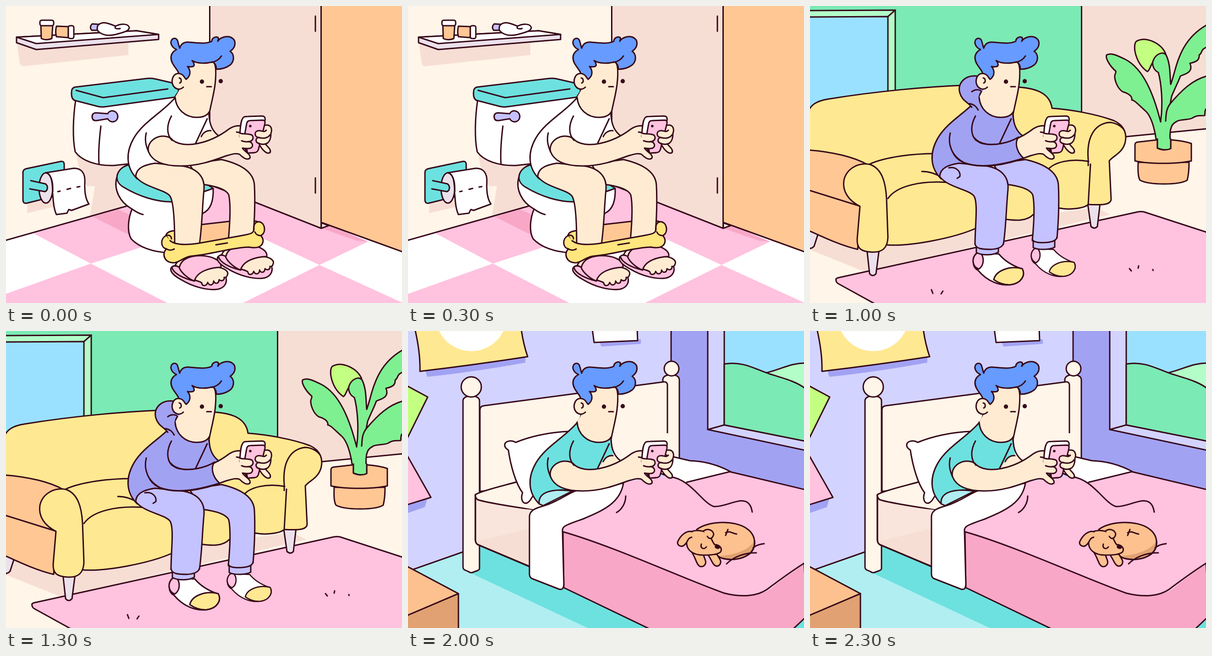
Recreate the animation shown at these times as an HTML page with a canvas. Size 864 by 648 pixels, loop 2.5 s.

```html
<!DOCTYPE html>
<html lang="en">
<head>
<meta charset="utf-8">
<title>Always on the phone</title>
<style>
html, body { margin: 0; width: 100%; height: 100%; overflow: hidden; background: #fff5e9; }
canvas { display: block; width: 864px; height: 648px; }
</style>
</head>
<body>
<canvas id="stage" width="864" height="648"></canvas>
<script>
const ctx = document.getElementById('stage').getContext('2d');
const SCENE_MS = 500;
const INK = '#360818', SKIN = '#ffebd2', WHITE = '#fff', CREAM = '#fff5e9', BLUSH = '#f7ded5',
  PINK = '#ffc2df', ROSE = '#f8a7c7', YELLOW = '#ffe67f', SOFA = '#ffe892', ORANGE = '#ffc794',
  BROWN = '#e1a172', TEAL = '#6de1df', ICE = '#b0eef1', SKY = '#9ae1ff', LILAC = '#c4c2ff',
  VIOLET = '#a2a2f3', PALE = '#d3d3ff', GREY = '#ebe1eb', GREEN = '#7ef091', MINT = '#7beab5',
  LIME = '#c3ff80', HAIR = '#679bff';

ctx.lineCap = ctx.lineJoin = 'round';

function fill(d, color) {
  ctx.fillStyle = color;
  ctx.fill(new Path2D(d));
}
function line(d, color = INK, width = 3) {
  ctx.strokeStyle = color;
  ctx.lineWidth = width;
  ctx.stroke(new Path2D(d));
}
function shape(d, color) {
  fill(d, color);
  line(d);
}
function oval(x, y, rx, ry, color, outlined = true, turn = 0) {
  ctx.beginPath();
  ctx.ellipse(x, y, rx, ry, turn, 0, 7);
  ctx.fillStyle = color;
  ctx.fill();
  if (!outlined) return;
  ctx.strokeStyle = INK;
  ctx.lineWidth = 3;
  ctx.stroke();
}
function bar(x, y, w, h, r, color) {
  ctx.beginPath();
  ctx.roundRect(x, y, w, h, r);
  ctx.fillStyle = color;
  ctx.fill();
  ctx.strokeStyle = INK;
  ctx.lineWidth = 3;
  ctx.stroke();
}
function back(color) {
  ctx.fillStyle = color;
  ctx.fillRect(0, 0, 864, 648);
}
function placed(x, y, scale, draw) {
  ctx.save();
  ctx.translate(x, y);
  ctx.scale(scale, scale);
  draw();
  ctx.restore();
}

// ---- the man ----
function head(chin = true) {
  fill('M396 132L380 180L369 199C371 226 392 243 416 243C432 243 441 238 444 228L455 175C460 146 460 126 451 121L405 118Z', SKIN);
  line('M451 121C459 126 459 146 456 172C453 195 447 215 443 237');
  if (chin) line('M369 199C371 226 392 243 416 243C432 243 440 238 444 230');
  shape('M377 148C376 138 359 128 360 111C361 102 366 98 372 95C361 90 357 80 362 73C366 69 372 70 374 75C376 80 377 87 379 92C382 82 390 78 400 79C421 81 437 83 449 77C449 70 458 65 463 69C464 72 463 75 462 77C467 68 481 65 490 68C504 74 502 90 489 99C498 104 499 119 490 128C481 135 469 138 459 138C459 131 456 125 451 122C440 125 418 127 406 119C411 124 412 130 408 132C404 133 400 133 396 132C403 140 404 152 393 160L385 151Z', HAIR);
  line('M470 109C465 117 458 121 449 123');
  shape('M389 155C384 146 371 144 365 154C359 166 364 178 374 181C379 182 384 180 387 177', SKIN);
  line('M378 157C383 158 384 166 379 168');
  line('M438 176H448');
  oval(427.5, 165, 4.7, 4.7, INK, false);
  oval(468.5, 164, 4.7, 4.7, INK, false);
}

function torso(color) {
  shape('M378 181C377 191 373 196 369 200C342 232 300 252 279 288C261 319 261 352 286 377C286 355 310 346 345 347L420 300L447 272C446 262 444 250 443 238', color);
}

function farArm(sleeve, long) {
  const arm = 'M443 238C444 261 452 275 465 284L440 297L414 300L438 246';
  fill(arm, long ? sleeve : SKIN);
  if (!long) {
    fill('M443 238C446 254 447 262 447 272C438 271 430 276 426 284L414 300L438 246Z', sleeve);
    line('M447 272C438 271 430 276 426 285');
  }
  line('M443 238C444 261 452 275 465 284M439 246L414 299');
}

function nearArm(sleeve, long) {
  shape('M511 324C503 320 494 323 480 327C450 338 420 349 380 349C345 349 320 341 311 318C305 295 335 275 359 288C372 304 398 304 418 300C448 294 470 281 487 268C495 263 505 260 514 262', SKIN);
  if (long) {
    fill('M466 332C440 342 410 349 380 349C340 347 304 332 304 290L330 270L361 289C372 304 398 304 418 300C433 297 444 293 455 286C446 297 450 318 466 332Z', sleeve);
    line('M306 277C300 302 309 328 337 342C368 354 412 349 466 332C450 318 446 297 455 286C444 293 433 297 418 300C398 304 372 304 361 291');
  } else {
    line('M306 277C302 292 305 305 311 318');
  }
  line('M361 240C350 260 350 280 362 293');
}

function phoneAndHands() {
  shape('M510 285C511 265 512 252 516 246C518 241 522 241 528 241L558 240Q567 240 565 250L550 312Q548 320 540 320L526 321Z', WHITE);
  shape('M520 285L525 257Q526 250 533 250L560 249Q566 249 565 256L551 312Q549 320 541 320L527 321Z', PINK);
  oval(533, 262, 2.8, 2.8, INK, false);
  shape('M509 276C512 281 530 277 537 282C542 289 537 296 528 296C538 296 541 306 534 310C529 312 522 311 516 310C519 317 536 324 532 332C526 337 517 331 510 324', SKIN);
  line('M514 294C519 296 523 297 528 296M503 275L509 276');
  shape('M566 260C577 258 582 267 578 278C578 290 574 299 566 301C570 307 580 313 576 320C568 325 556 310 552 300C542 297 545 287 552 287C541 286 541 273 551 272C558 271 563 277 568 271', SKIN);
  line('M552 287C562 290 572 288 576 281M552 300C557 302 562 302 566 301');
}

function upperBody(sleeve, long) {
  farArm(sleeve, long);
  nearArm(sleeve, long);
  head();
  phoneAndHands();
}

function legs(color, ankle) {
  shape('M485 512C489 470 490 430 486 412C481 401 460 393 428 389L400 345L470 335C505 343 541 358 542 392C544 430 542 470 539 506', color);
  shape(`M${ankle} 520C${ankle} 480 367 430 358 415C348 400 300 396 283 372C284 354 300 347 325 343L385 349C420 355 434 375 432 400C428 440 428 480 422 520`, color);
}

// ---- bathroom ----
function slipper() {
  shape('M366 567C354 572 358 584 382 597C408 613 440 621 462 618C478 615 484 602 479 590L420 568Z', PINK);
  shape('M369 566C375 553 392 543 412 543L424 560L388 574Z', SKIN);
  shape('M412 598C412 583 430 573 460 570C476 571 487 579 483 587C482 591 479 593 476 592C477 600 469 601 465 597C464 607 456 607 453 600C453 609 444 612 440 603C438 611 428 613 427 604C423 601 417 600 412 598Z', SKIN);
  shape('M378 571C382 551 404 543 432 545C458 548 471 559 469 570C444 571 417 579 411 600C399 596 382 582 378 571Z', PINK);
  line('M362 570C364 583 388 595 411 600');
}

function bathroom() {
  back(WHITE);
  fill('M60 496L190 458L450 380L543 428L688 485L705 478L790 514L684 565L545 500L330 515L185 562ZM0 628L185 562L352 648H0ZM517 648L684 565L866 648Z', PINK);
  fill('M190 460L245 444L280 460V505ZM688 485L705 478L790 514L765 512Z', ROSE);
  fill('M0 0H444V390L240 442L0 511Z', CREAM);
  fill('M153 320C158 355 165 385 178 393H194L183 460L250 441L290 380V340ZM47 430L46 452L106 438V420ZM24 82L66 96L267 80V107L42 131Q32 133 30 125Z', BLUSH);
  line('M0 511L265 436');
  shape('M444.500 -5V390L543 428L687.500 485V-5Z', BLUSH);
  shape('M687.500 -5V472L870 538V-5Z', ORANGE);
  shape('M688 485L704 479L688 473Z', CREAM);
  line('M675 22V55M675 375V408');

  shape('M23 68L285 54L333 62V73L66 95L23 80Z', GREY);
  shape('M23 68L285 54L333 62L66 82Z', WHITE);
  shape('M76 42L77 71Q88 76 100 71L102 42Z', ORANGE);
  bar(74, 31, 30, 12, 4, WHITE);
  shape('M136 45L110 44Q107 56 110 67L136 69Z', ORANGE);
  bar(136, 43, 12, 28, 4, WHITE);
  shape('M203 40L188 39Q181 46 187 53L201 53Z', LILAC);
  shape('M203 40C213 33 224 38 239 44C251 38 267 38 269 47C269 55 254 58 240 62C224 66 209 64 200 54C198 48 199 43 203 40Z', WHITE);
  line('M239 44C235 49 243 51 249 49');

  shape('M37 363Q37 357 44 355L120 339Q127 338 127 346V410L46 430Q38 432 37 424Z', TEAL);
  shape('M86 364L148 354C165 354 173 365 172 384C171 405 173 421 181 432L143 446L137 444L133 452L110 455C103 440 103 420 101 400Z', WHITE);
  oval(87, 397, 15, 33, GREY);
  line('M88 364C101 368 101 389 102 405');
  fill('M53 381L86 388C92 392 92 402 85 405L52 399Z', TEAL);
  line('M54 381L86 388C92 392 92 402 85 405L52 399M113 405L118 404M133 400L141 398M155 395L161 394');

  shape('M152 205C146 245 145 290 151 318C165 338 198 349 235 348L290 342L370 199Z', WHITE);
  shape('M150 177L308 158Q317 157 325 159L377 171L376 187L368 199L215 220Q208 221 200 219L150 206Q142 203 143 188Q143 179 150 177Z', TEAL);
  line('M153 184L212 200L353 181M207 262C203 295 201 320 203 345');
  shape('M222 235L196 233Q187 234 188 243Q189 251 198 250L222 246C227 256 243 255 244 241C243 227 226 225 222 235Z', LILAC);

  shape('M242 373C234 400 248 428 275 443C266 465 264 492 273 508C290 526 320 537 360 539L430 452C447 444 453 423 452 398Z', WHITE);
  shape('M265 347C239 357 234 382 256 395C289 415 330 429 368 427L452 398L410 370Z', TEAL);
  line('M275 443C282 448 290 453 299 455');

  shape('M349 500C352 490 367 490 390 488L530 470C545 466 561 472 563 488L550 515L360 520Z', YELLOW);
  fill('M390 483L530 466V507L390 513Z', ORANGE);
  line('M390 481L530 465');
  torso(WHITE);
  legs(SKIN, 368);
  slipper();
  placed(107, -15, .985, slipper);
  shape('M349 501C336 508 337 527 350 530C339 540 345 562 368 560C380 558 387 549 402 546C450 542 490 527 530 526C548 530 561 525 561 511C560 506 558 503 556 501C567 496 567 476 554 471C545 469 540 476 541 486C542 497 529 498 514 501L424 517C400 521 371 523 358 512', YELLOW);
  line('M458 521L483 517M349 501C355 498 361 502 361 508M556 501C550 501 545 498 543 493M350 530C356 534 363 533 367 530');
  upperBody(WHITE);
}

// ---- shower ----
function bubble(x, y, r, color, outlined) {
  oval(x, y, r, r, color, outlined);
  if (r < 12) return;
  const k = outlined ? .26 : .39;
  oval(x - r * .26, y - r * k, r * .36, r * .27, WHITE, false, -.45);
}

function shower() {
  back(SKY);
  fill('M0 0H183V648H0Z', '#bdeeff');
  fill('M123 85C124 115 130 136 139 136C147 136 151 112 149 85ZM111 335C113 362 118 380 126 380C134 380 138 362 138 335Z', SKY);
  line('M182.500 0V185M637 0V71');
  oval(135, 66, 15, 32, WHITE);
  shape('M142 59H198Q204 59 208 63L231 86L219 97L196 73H142C133 72 133 60 142 59Z', WHITE);
  shape('M222 82L214 91L224 100L231 90Z', GREY);
  shape('M219 142C202 118 214 91 240 85C261 82 278 88 286 97Z', GREY);
  oval(252, 125, 42, 21, WHITE, true, -.67);
  oval(255, 128, 33, 14, WHITE, true, -.67);
  for (const [x, y] of [[241, 133], [250, 124], [260, 118], [270, 121], [262, 130], [250, 139], [239, 143]])
    oval(x, y, 2.500, 1.800, INK, false, -.6);
  line('M289 127L345 158M278 140L311 166M321 174L346 194M253 161L259 171M267 182L302 235M341 126L344 134M264 248L276 249M276 275L283 271', WHITE, 3.500);
  oval(126, 315, 18, 34, WHITE);
  shape('M143 296C119 293 114 334 143 334Z', SKY);
  oval(143, 315, 11, 19, WHITE);

  shape('M318 550C310 480 300 390 312 325L449 335C474 383 468 445 441 455V550Z', SKIN);
  fill('M378 181C377 200 348 215 325 240C296 268 300 310 320 335L450 336L436 290L443 230L450 170Z', SKIN);
  line('M378 181C377 200 348 215 325 240C296 268 301 309 318 330M443 237C437 261 435 275 436 294M431 394C427 397 427 404 432 405M392 478V535M441 455C435 460 428 463 420 465');
  shape('M387 466C381 473 385 481 393 480L398 477C401 485 402 496 409 496C417 495 414 485 410 476C416 480 423 475 421 464', SKIN);
  fill('M443 238C444 261 452 275 465 284L436 296L437 260Z', SKIN);
  line('M442 243C444 261 452 275 465 284');
  fill('M361 240L308 265L305 300C310 340 345 349 380 349L418 300C398 304 372 304 362 293Z', SKIN);
  fill('M511 324C450 343 420 349 380 349L362 293C372 304 398 304 418 300C448 294 470 281 487 268L514 262Z', SKIN);
  line('M361 240C350 260 350 280 362 293C372 304 398 304 418 300C448 294 470 281 487 268C495 263 505 260 514 262M511 324C503 320 494 323 480 327C450 338 420 349 380 349C349 349 326 341 315 327');
  head(false);
  phoneAndHands();

  bubble(205, 402, 30.500, PINK, true);
  bubble(250, 354, 13, PINK, true);
  bubble(675, 273, 25, PINK, true);
  shape('M-5 397C20 398 43 414 47 441C130 420 222 445 229 576C245 553 280 553 292 568C308 518 375 508 405 538C435 492 510 490 530 524C528 495 552 475 578 474C570 435 615 420 629 443C634 400 665 375 705 376C705 285 800 255 838 335C843 318 855 309 870 309V660H-5Z', PINK);
  for (const [x, y, r] of [[172, 576, 29], [141, 516, 11], [512, 647, 49], [651, 561, 25], [856, 552, 42]])
    bubble(x, y, r, '#ffd2e9', false);
}

// ---- living room ----
function sock() {
  shape('M364 539C353 549 353 570 367 577C387 601 414 611 438 608C461 605 471 587 463 574C443 567 425 557 412 541Z', WHITE);
  shape('M364 539C352 549 353 568 368 574C381 566 380 547 372 539Z', PINK);
  shape('M401 597C405 578 434 566 463 573C471 587 461 605 438 608C424 609 411 604 401 597Z', SOFA);
}

function plant() {
  shape('M776 104C766 81 733 65 712 77C703 86 710 125 736 143C744 139 742 120 760 115Z', LIME);
  shape('M757 320C757 280 746 243 733 230C716 215 709 206 702 205C704 195 690 189 682 187C671 180 664 162 665 151C667 146 668 144 667 142C655 132 644 114 647 107C655 101 669 107 689 117C728 138 750 193 765 253C771 210 766 166 760 145C752 141 746 132 748 121C754 104 770 98 777 107C787 128 785 152 787 171C800 137 803 74 870 39V88C849 95 858 102 849 107C850 118 843 122 829 125C838 146 815 149 808 153C804 165 798 175 789 197L786 213C808 187 835 159 870 152V220C858 226 863 236 861 239C846 239 840 240 835 244C830 249 803 247 800 252C786 258 783 270 787 320Z', GREEN);
  line('M786 213C777 225 777 235 776 251');
  shape('M716 341C715 360 716 374 720 380C740 391 805 391 823 380Q827 365 827 341Z', ORANGE);
  shape('M709 303Q709 298 714 297L758 292V310C770 315 779 315 787 311V292Q815 294 832 300V338C800 345 740 345 709 338Z', ORANGE);
  fill('M758 290H786V311C777 315 767 315 758 310Z', GREEN);
  line('M758 290V310C770 315 779 315 787 311V290');
}

function livingRoom() {
  back(CREAM);
  fill('M0 0H592V300H0Z', MINT);
  fill('M592 0H864V268L592 296Z', BLUSH);
  line('M592.500 0V240M690 285L864 268');
  shape('M-5 10L186 9V240H-5Z', '#b2fdc8');
  shape('M-5 24L170 23V240H-5Z', SKY);
  line('M170 23L186 9');
  plant();
  fill('M0 500V532L120 580L655 455L625 440L150 500Z', BLUSH);
  shape('M57 598Q55 595 61 593L716 449Q722 448 728 449L870 495V660H160L62 606Q56 602 57 598Z', PINK);
  line('M265 619L268 627M290 622L286 628M697 573L701 578M717 567L716 572M748 575L748.500 577');

  shape('M-5 488L18 496L9 524Q3 531 -5 528Z', GREY);
  shape('M124 530L130 584Q137 592 144 584L151 530Z', GREY);
  shape('M606 432L613 481Q621 488 627 481L633 430Z', GREY);
  shape('M-5 235C0 215 15 207 40 203C150 185 260 176 335 173L455 177C500 180 524 194 528 223C570 226 625 236 663 250C688 261 692 282 687 300C680 322 661 327 653 338L657 422C656 432 645 435 607 433C601 440 570 446 545 441L487 455C474 469 451 469 425 465L362 485C315 506 216 526 165 521L-5 400Z', SOFA);
  line('M607 335C603 287 620 258 652 254C668 254 680 263 685 270M612 345L607 433M517 360C530 340 570 332 608 339M607 335V348M130 345C165 329 225 322 275 322M244 361C262 361 272 366 285 372M170 420C190 391 245 381 301 385');
  shape('M-5 314C50 318 98 330 125 346L110 437L104 531C68 523 28 504 -5 489Z', ORANGE);
  line('M-5 401L110 437');
  shape('M109 437C85 425 70 405 74 380C80 354 107 340 132 346C157 356 165 384 167 420L170 505C169 528 158 538 135 537C110 536 102 528 103 508Z', SOFA);

  torso(VIOLET);
  const hood = 'M366 153C338 149 321 169 327 190C332 207 344 209 353 221';
  fill(hood + 'L375 232L378 180Z', VIOLET);
  line(hood + 'M348 213C356 214 363 219 367 227M353 187C361 181 372 182 374 187C369 193 368 200 371 209');
  sock();
  placed(172, 59, .873, sock);
  shape('M487 512V527C500 533 525 532 534 526V510Z', LILAC);
  shape('M363 525V538C377 545 400 544 411 537V525Z', LILAC);
  legs(LILAC, 360);
  shape('M360 518C361 530 375 531 395 531C412 530 420 526 422 518', LILAC);
  shape('M485 508C486 516 500 517 515 516C530 515 538 511 539 504', LILAC);
  line('M303 353C319 350 329 361 327 372L321 376');
  upperBody(VIOLET, true);
}

// ---- kitchen ----
function kitchen() {
  back('#fff9ed');
  shape('M-5 -5H558V28Q558 37 549 38L-5 73Z', ROSE);
  line('M179 0V62M402 0V47M156 21V39M201.500 19V36M528 39L530 120');
  fill('M0 500L130 470H864V648H0Z', BROWN);
  shape('M179 272L611 205V350H179Z', '#fcc18f');
  shape('M-5 300L179 272V490L-5 535Z', YELLOW);
  shape('M-5 174L530 119L611 130V208L-5 300Z', PINK);
  line('M0 274L177 248M526 200L611 188');
  shape('M72 315L118 307C126 307 126 318 119 320L74 327C66 327 65 317 72 315Z', GREY);
  fill('M612 0H864V574L750 552L612 500Z', YELLOW);
  line('M612 -5V45C613 66 615 79 623 82L870 101M621 80C612 89 612 101 612 130V330M740 550L870 575');
  bar(639.500, -20, 17, 86, 8.500, GREY);
  bar(639.500, 126, 17, 128, 8.500, GREY);

  shape('M215 345L205 270C205 247 246 235 310 230L340 231V345Z', BLUSH);
  shape('M228 345L221 285C219 258 220 251 231 246C257 234 300 229 340 231V345Z', CREAM);
  torso(WHITE);
  bar(464, 590, 31, 80, 0, '#f0e5ea');
  fill('M465.500 595H493.500V621Q479 625 465.500 621Z', '#d9cdd4');
  shape('M109 441V462C115 540 270 602 472 602C674 602 829 540 835 462V441Z', ICE);
  oval(472, 441, 363, 136.500, ICE);

  oval(396, 467, 153, 65, WHITE);
  shape('M303 403C300 384 310 366 328 366C344 366 355 378 353 391C366 390 377 399 378 410C391 407 402 414 405 423C418 423 427 432 424 445L390 470L300 453C280 457 272 440 275 428C279 420 286 416 293 417C290 411 295 404 303 403Z', GREEN);
  shape('M302 432C294 447 300 472 317 484C354 508 420 512 455 503C491 494 509 473 503 452L495 441Z', '#f5d8c4');
  shape('M302 438C309 424 332 422 358 429C390 437 416 452 437 443C457 429 484 431 494 445C504 468 475 488 435 492C394 496 344 488 319 473C303 463 297 449 302 438Z', ROSE);
  shape('M423 466C425 458 438 460 448 456C459 448 470 448 470 456C468 469 447 475 432 474C425 473 421 470 423 466Z', WHITE);
  oval(481.500, 391, 16, 8, GREEN);
  oval(520, 402.500, 11, 6, GREEN);
  shape('M194 638L202 660H218L209 632Z', GREY);
  shape('M-5 588C40 564 78 552 105 556C150 563 197 600 217 614C226 624 220 630 209 633L140 655H-5Z', '#f5d8c4');
  shape('M650 655C695 623 790 604 870 586V660Z', '#f5d8c4');
  upperBody(WHITE);
}

// ---- bedroom ----
function dog() {
  shape('M630 433C655 414 713 412 739 431C761 446 761 474 744 487C725 500 695 501 680 493L640 470Z', '#fcc18f');
  fill('M680 491C715 488 741 478 754 461C757 490 715 504 683 496Z', BROWN);
  line('M693 440C704 435 706 442 717 443M693 446L698 433M680 494C702 502 728 499 744 487C754 478 757 468 756 458');
  shape('M620 484C628 496 630 512 638 514C647 515 651 507 649 501L643 484ZM654 488C662 497 664 511 673 513C681 513 684 505 681 499L674 487Z', '#fcc18f');
  shape('M609 443C618 434 639 432 655 442C661 448 663 459 669 466C679 466 687 474 682 482C676 488 660 489 644 489C622 489 606 478 608 459Z', '#fcc18f');
  shape('M620 438C608 434 594 446 588 461C588 469 598 473 604 466C611 460 609 452 619 450', '#fcc18f');
  shape('M645 436C654 430 665 434 667 443C665 453 658 456 653 448', '#fcc18f');
  oval(675, 471, 6, 4.500, INK, false, .2);
  line('M640 465C637 474 646 478 651 471M695 508C711 492 737 483 760 484M753 473C760 467 769 465 777 464');
}

function bedroom() {
  back(PALE);
  fill('M574 0H864V400H574Z', VIOLET);
  line('M574 0V80');
  fill('M38 86L42 100Q140 90 256 69V55ZM418 24L422 34L508 28V18ZM0 375L42 366L37 384L0 397Z', VIOLET);
  shape('M15 -5C23 30 27 60 26 88Q145 74 261 56Q251 26 247 -5Z', SOFA);
  oval(138, -34, 78, 78, WHITE, false);
  shape('M402 -5L406 25L501 21L500 -5Z', WHITE);
  shape('M-5 118L43 144L-5 241Z', LIME);
  shape('M-5 266L50 363L-5 380Z', PINK);
  shape('M654 -5V215L870 261V-5Z', PALE);
  shape('M690 -5V205L870 241V-5Z', SKY);
  shape('M778 92C812 85 834 69 870 70V140Z', '#b2fdc8');
  shape('M690 72C730 65 757 83 790 94C820 103 850 111 870 128V241L690 205Z', MINT);
  line('M654 215L690 205');

  fill('M0 524L120 482L300 440L864 600V648H0Z', ICE);
  fill('M130 525L158 470L300 520L864 600V648H392Z', TEAL);
  line('M0 524L120 482');
  shape('M-5 512L110 573V660H-5Z', BROWN);
  shape('M-5 512L110 573L-5 622Z', '#fcc18f');

  shape('M556 300V105Q558 96 574 95Q592 96 592 107V290Z', CREAM);
  oval(575, 82, 16, 16, CREAM);
  shape('M157 350V172Q157 164 166 163L558 111Q566 110 566 119V300Z', CREAM);
  fill('M564 223H568V310H564Z', CREAM);
  shape('M120 153Q120 142 138 142Q156 142 156 153V518Q156 521 151 523L140 527Q136 528 132 525L123 521Q120 519 120 514Z', CREAM);
  oval(138, 122, 22, 22, CREAM);

  shape('M147 357C165 346 230 333 255 324L340 440V545L152 466Q147 463 147 455Z', BLUSH);
  shape('M147 357C165 346 230 333 255 324L360 360L280 392C260 387 178 377 152 368Q146 363 147 357Z', CREAM);
  fill('M149 370C178 378 230 387 270 390V430L149 459Z', '#f9e5dc');
  line('M147 358V455Q147 463 152 466L265 514');
  shape('M355 219C305 220 262 232 235 243C225 237 211 240 211 249C211 256 217 258 219 260C224 294 235 333 250 353C245 366 250 379 260 375C268 371 268 365 272 361L340 320Z', WHITE);
  shape('M560 270L615 283C648 284 678 293 704 307L608 334L550 310Z', WHITE);

  shape('M338 435L864 500L870 622L830 660H548L340 560Z', ROSE);
  fill('M470 330L530 320L572 318L608 330L702 307L870 345V503L803 553C784 573 758 581 700 573C600 540 450 470 338 438L330 420L440 380Z', PINK);
  line('M608 330L702 307L870 347M338 438C450 470 600 540 690 572C730 582 763 578 783 564C803 549 838 523 870 503M572 318C617 323 643 377 668 383C699 385 744 347 751 395M475 360C475 376 466 390 455 396');
  torso(TEAL);
  shape('M286 377C284 353 309 347 335 347L359 349L295 381Z', ICE);
  shape('M265 404C267 383 297 385 318 373C337 365 349 355 365 349L470 332C463 375 427 391 382 410C351 421 336 425 337 435L340 551Q340 567 329 563L270 540Q264 537 265 525Z', WHITE);
  dog();
  upperBody(TEAL);
}

const scenes = [bathroom, shower, livingRoom, kitchen, bedroom];
let shown = -1;
function tick() {
  const index = Math.floor(performance.now() / SCENE_MS) % scenes.length;
  if (index !== shown) scenes[shown = index]();
  requestAnimationFrame(tick);
}
tick();
</script>
</body>
</html>
```
